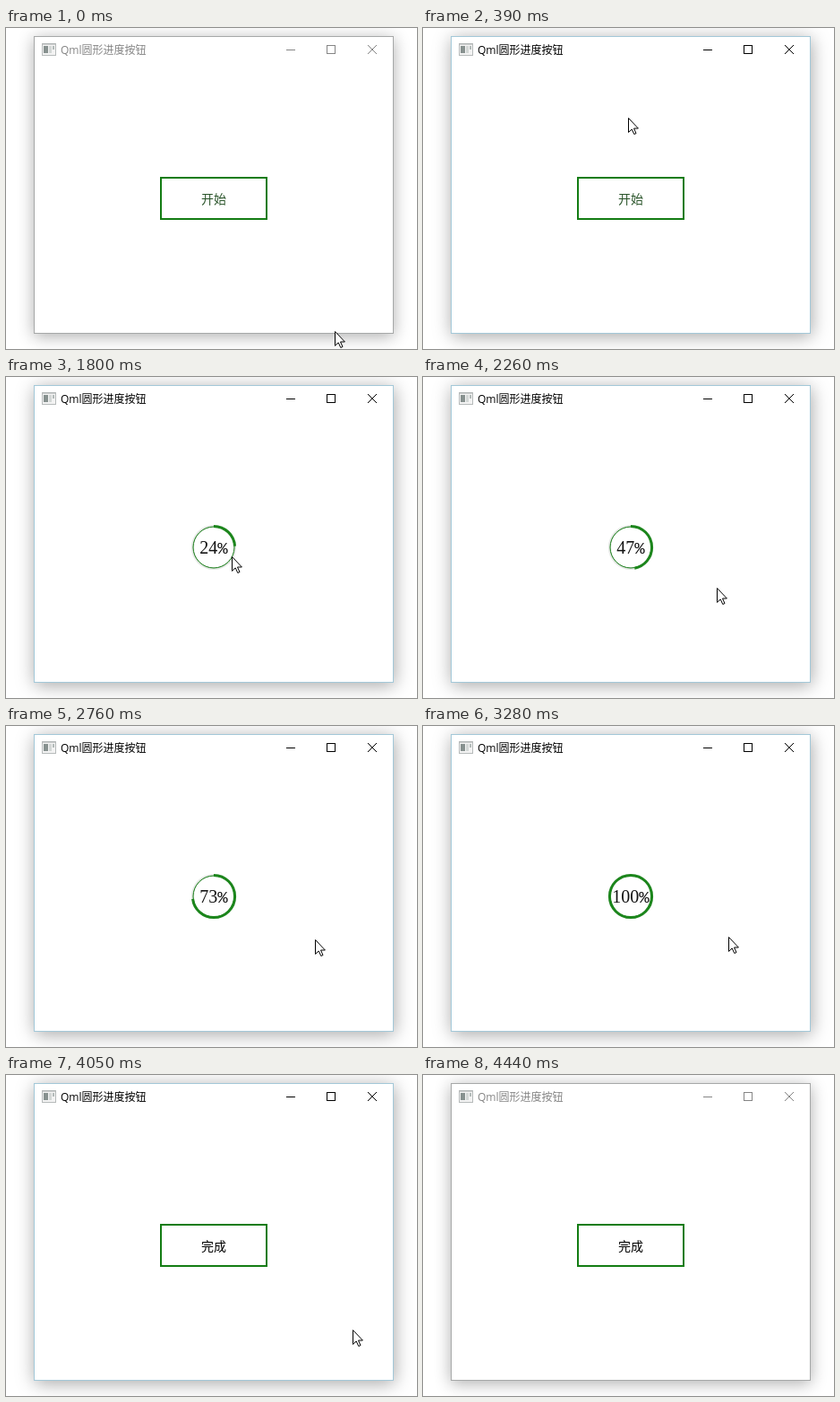
Write an HTML page that moves like this. It is 459 px wide and 358 px high and loops after 4510 ms.

```html
<!DOCTYPE html>
<html lang="zh">
<head>
<meta charset="utf-8">
<title>Qml圆形进度按钮</title>
<style>
  html, body { margin: 0; width: 100%; height: 100%; overflow: hidden; background: #fff; }
  .win {
    position: absolute; left: 31px; top: 9px; width: 402px; height: 332px;
    box-sizing: border-box; background: #fff; border: 1px solid #a6a8a8;
    box-shadow: 0 3px 17px rgba(0, 0, 0, .32);
  }
  .active .win { border-color: #a3c8d8; box-shadow: 1px 3px 19px rgba(0, 0, 0, .35); }
  svg { position: absolute; left: 0; top: 0; display: block; }
  .bar { color: #858585; }
  .active .bar { color: #000; }
  .title { font: 12px "Open Sans", "Noto Sans CJK SC", "Noto Sans CJK", sans-serif; fill: currentColor; }
  .controls { fill: none; stroke: currentColor; }
  .label { font: 14px "Noto Sans CJK SC", "Noto Sans CJK", sans-serif; text-anchor: middle; }
  .percent { font: 20px "Liberation Serif", serif; text-anchor: middle; fill: #111; }
  .sign { font: 19px "Liberation Mono", monospace; }
  .green { fill: none; stroke: #137c13; }
  #arc { stroke: #1c861c; }
</style>
</head>
<body>
<div class="win"></div>
<svg width="459" height="358" viewBox="0 0 459 358">
  <g class="bar">
    <rect x="40.5" y="17.5" width="15" height="13" fill="#f3f3f3" stroke="#b6baba"/>
    <path d="M41 18H55" stroke="#a8acac"/>
    <rect x="42" y="20" width="5" height="8" fill="#87918f"/>
    <rect x="48" y="20" width="3" height="8" fill="#d3d7d6"/>
    <rect x="52" y="20" width="2" height="4" fill="#b3bbb9"/>
    <text class="title" x="61" y="29">Qml圆形进度按钮</text>
    <g class="controls">
      <path d="M313 24.5H323"/>
      <rect x="358.5" y="19.5" width="9" height="9"/>
      <path d="M404 19L414 29M414 19L404 29"/>
    </g>
  </g>
  <rect id="box" class="green" y="167" height="46" stroke-width="2"/>
  <text id="label" class="label" x="232" y="196"></text>
  <g id="ring">
    <circle cx="232" cy="190" r="23.6" fill="none" stroke="#e6e9e6" stroke-width="3"/>
    <circle class="green" cx="232" cy="190" r="23" stroke-width="1"/>
    <circle id="arc" class="green" cx="232" cy="190" r="23.6" stroke-width="3"
            pathLength="100" transform="rotate(-90 232 190)"/>
    <text class="percent" x="232" y="197"><tspan id="num"></tspan><tspan class="sign">%</tspan></text>
  </g>
  <path id="cursor" d="M.5.5V16.4L4.2 12.9L6.8 18.5L9 17.5L6.5 12H11.4Z" fill="#fff" stroke="#000"/>
</svg>
<script>
  const LOOP = 4510, TICK = LOOP / 70;   // the screen refreshes 70 times per loop
  const $ = id => document.getElementById(id);
  const box = $('box'), label = $('label'), ring = $('ring'), arc = $('arc'), num = $('num'), cursor = $('cursor');
  const show = (el, on) => { el.style.display = on ? '' : 'none'; };

  // Share of the span from start to start + length that has passed, 0 to 1
  const part = (t, start, length) => Math.min(1, Math.max(0, (t - start) / length));

  // Pointer moves: start, duration, where it comes to rest
  const moves = [
    [0, 325, 229, 100],
    [450, 390, 235, 193],
    [1540, 260, 251, 200],
    [1800, 640, 360, 249],
    [2440, 200, 345, 238],
    [2760, 470, 341, 235],
    [3860, 510, 460, 360]
  ];

  function pointer(t) {
    let x = 367, y = 338;
    for (const [start, length, toX, toY] of moves) {
      const k = part(t, start, length);
      x += (toX - x) * k;
      y += (toY - y) * k;
    }
    return [Math.round(x), Math.round(y)];
  }

  function draw(time) {
    const t = Math.floor(time % LOOP / TICK + 0.2) * TICK % LOOP;

    document.body.classList.toggle('active', t > 380 && t < 4430);

    // 0 = full button, 1 = circle
    const fold = part(t, 995, 295) - part(t, 3324, 300);
    const width = 120 - 72 * fold;
    box.setAttribute('x', Math.floor(232 - width / 2) + 1);
    box.setAttribute('width', width - 2);
    box.setAttribute('rx', 23 * fold);
    show(box, fold < 1);
    show(ring, fold >= 1);

    const done = t > 2000;
    label.textContent = done ? '完成' : '开始';
    label.setAttribute('fill', done ? '#000' : '#2b552b');
    show(label, fold <= 0);

    const pct = Math.floor(100 * part(t, 1325, 1960));
    num.textContent = pct;
    arc.setAttribute('stroke-dasharray', pct + ' 200');

    cursor.setAttribute('transform', `translate(${pointer(t)})`);
  }

  function loop(time) {
    draw(time);
    requestAnimationFrame(loop);
  }
  draw(0);
  requestAnimationFrame(loop);
</script>
</body>
</html>
```
